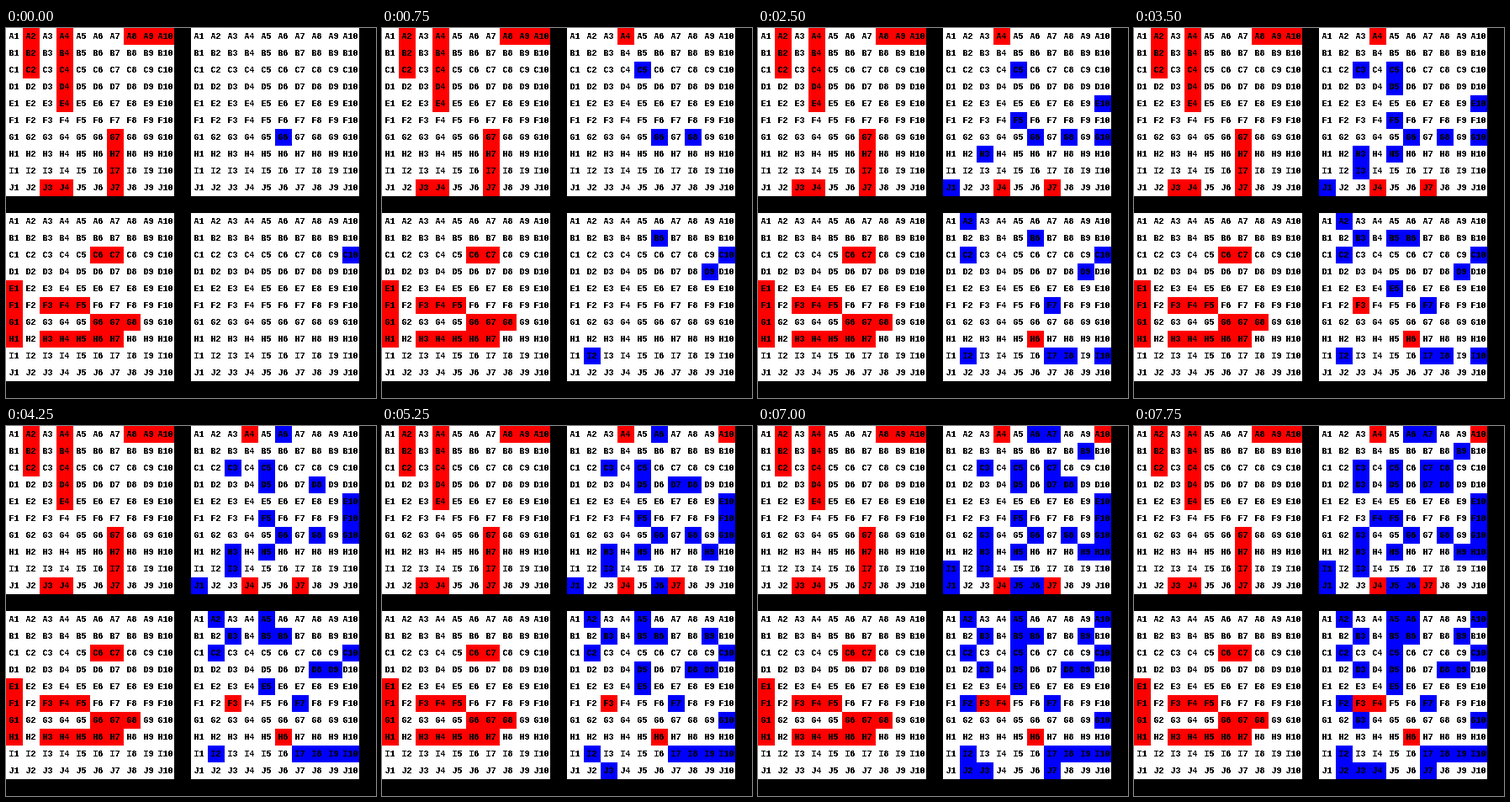
These frames come from a looping animation (440 px wide and 440 px high, 8 s). An HTML page with a canvas:

```html
<!DOCTYPE html>
<html lang="en">
<head>
<meta charset="utf-8">
<style>
  html, body { margin: 0; width: 100%; height: 100%; overflow: hidden; background: #000; }
  canvas { display: block; }
</style>
</head>
<body>
<canvas id="stage" width="440" height="440"></canvas>
<script>
const SIZE = 440, CELL = 20, BOARD = 220, STEP = 250;
const list = text => text.split(' ');

// One entry per player: ships on the left, one shot per step on the right.
const games = [
  {
    ships: list('A2 B2 C2 A4 B4 C4 D4 E4 A8 A9 A10 G7 H7 I7 J7 J3 J4'),
    shots: list('G6 G8 A4 C5 J4 G10 J1 H3 E10 J7 F5 D5 I3 C3 H5 D8 ' +
      'A6 F10 J6 A10 H9 D7 I1 B9 A7 H10 J5 G3 C7 F4 D3 C8')
  },
  {
    ships: list('C6 C7 E1 F1 G1 H1 F3 F4 F5 G6 G7 G8 H3 H4 H5 H6 H7'),
    shots: list('C10 I2 B6 D9 A2 F7 C2 I8 H6 I10 I7 B5 F3 E5 B3 I9 ' +
      'D8 A5 J3 G10 B9 D5 F2 A10 J2 C5 F4 J7 D3 G3 J4 A6')
  }
];

const ctx = document.getElementById('stage').getContext('2d');
const labels = makeLabels();

// Cell names as a hard-edged black layer.
function makeLabels() {
  const layer = document.createElement('canvas');
  layer.width = layer.height = SIZE;
  const g = layer.getContext('2d');
  g.font = 'bold 10px "Liberation Mono", "Courier New", monospace';
  g.textAlign = 'center';
  for (const x of [0, BOARD]) for (const y of [0, BOARD])
    for (let row = 0; row < 10; row++)
      for (let col = 0; col < 10; col++)
        g.fillText('ABCDEFGHIJ'[row] + (col + 1),
          x + col * CELL + 9.5, y + row * CELL + 13);
  const image = g.getImageData(0, 0, SIZE, SIZE);
  for (let i = 3; i < image.data.length; i += 4)
    image.data[i] = image.data[i] > 110 ? 255 : 0;
  g.putImageData(image, 0, 0);
  return layer;
}

function fillCell(name, x, y, color) {
  ctx.fillStyle = color;
  ctx.fillRect(x + (name.slice(1) - 1) * CELL,
    y + (name.charCodeAt(0) - 65) * CELL, CELL, CELL);
}

function draw() {
  const step = Math.floor(performance.now() / STEP) % games[0].shots.length;
  ctx.fillStyle = '#000';
  ctx.fillRect(0, 0, SIZE, SIZE);
  games.forEach(({ ships, shots }, i) => {
    const y = i * BOARD;
    ctx.fillStyle = '#fff';
    ctx.fillRect(0, y, 200, 200);
    ctx.fillRect(BOARD, y, 200, 200);
    for (const ship of ships) fillCell(ship, 0, y, '#f00');
    for (const shot of shots.slice(0, step + 1))
      fillCell(shot, BOARD, y, ships.includes(shot) ? '#f00' : '#00f');
  });
  ctx.drawImage(labels, 0, 0);
  requestAnimationFrame(draw);
}
draw();
</script>
</body>
</html>
```
